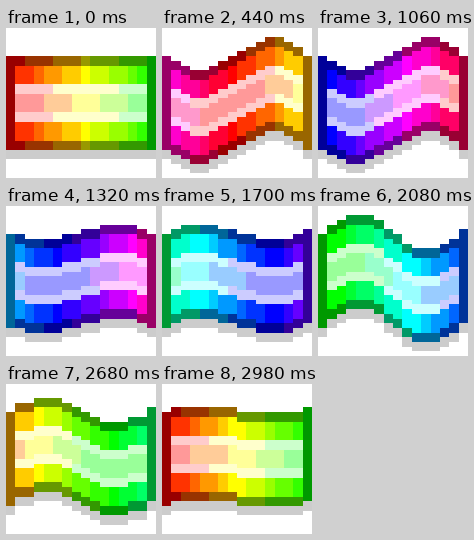
Write an HTML page with a canvas that moves like this. It is 150x150 px and loops after 3 s.

```html
<!DOCTYPE html>
<html lang="en">
<head>
<meta charset="utf-8">
<title>Waving rainbow flag</title>
<style>
  html, body { margin: 0; width: 100%; height: 100%; overflow: hidden; background: #fff; }
  canvas { display: block; width: 150px; height: 150px; image-rendering: pixelated; }
</style>
</head>
<body>
<canvas width="16" height="32"></canvas>
<script>
const ctx = document.querySelector('canvas').getContext('2d');
const LOOP = 3000, STEP = 20, TOP = 6;

// Stripes from top to bottom: [lightness, height in half cells]
const DARK = 0.25;
const STRIPES = [[DARK, 2], [0.5, 4], [0.875, 2], [0.75, 4], [0.875, 2], [0.5, 4], [DARK, 2]];

// Fully saturated HSL, snapped to the 216 web-safe colours
function webColor(hue, light) {
  const a = Math.min(light, 1 - light);
  const channel = n => {
    const k = (n + hue / 30) % 12;
    const v = light - a * Math.max(-1, Math.min(k - 3, 9 - k, 1));
    return Math.round(Math.round(v * 255) / 51) * 51;
  };
  return `rgb(${channel(0)}, ${channel(8)}, ${channel(4)})`;
}

function draw(time) {
  const phase = Math.floor(time % LOOP / STEP) * STEP / LOOP;
  const swing = 4 * Math.sin(phase * 2 * Math.PI);
  ctx.fillStyle = '#fff';
  ctx.fillRect(0, 0, 16, 32);

  for (let x = 0; x < 16; x++) {
    const hue = (360 + x * 7.5 - phase * 360) % 360;
    const edge = x === 0 || x === 15;
    let y = TOP + Math.floor(swing * Math.sin(x * 0.419));
    for (const [light, height] of STRIPES) {
      ctx.fillStyle = webColor(hue, edge ? DARK : light);
      ctx.fillRect(x, y, 1, height);
      y += height;
    }
    ctx.fillStyle = '#ccc'; // shadow
    ctx.fillRect(x, y, 1, 2);
  }
}

const start = performance.now();
function tick() {
  draw(performance.now() - start);
  requestAnimationFrame(tick);
}
tick();
</script>
</body>
</html>
```
